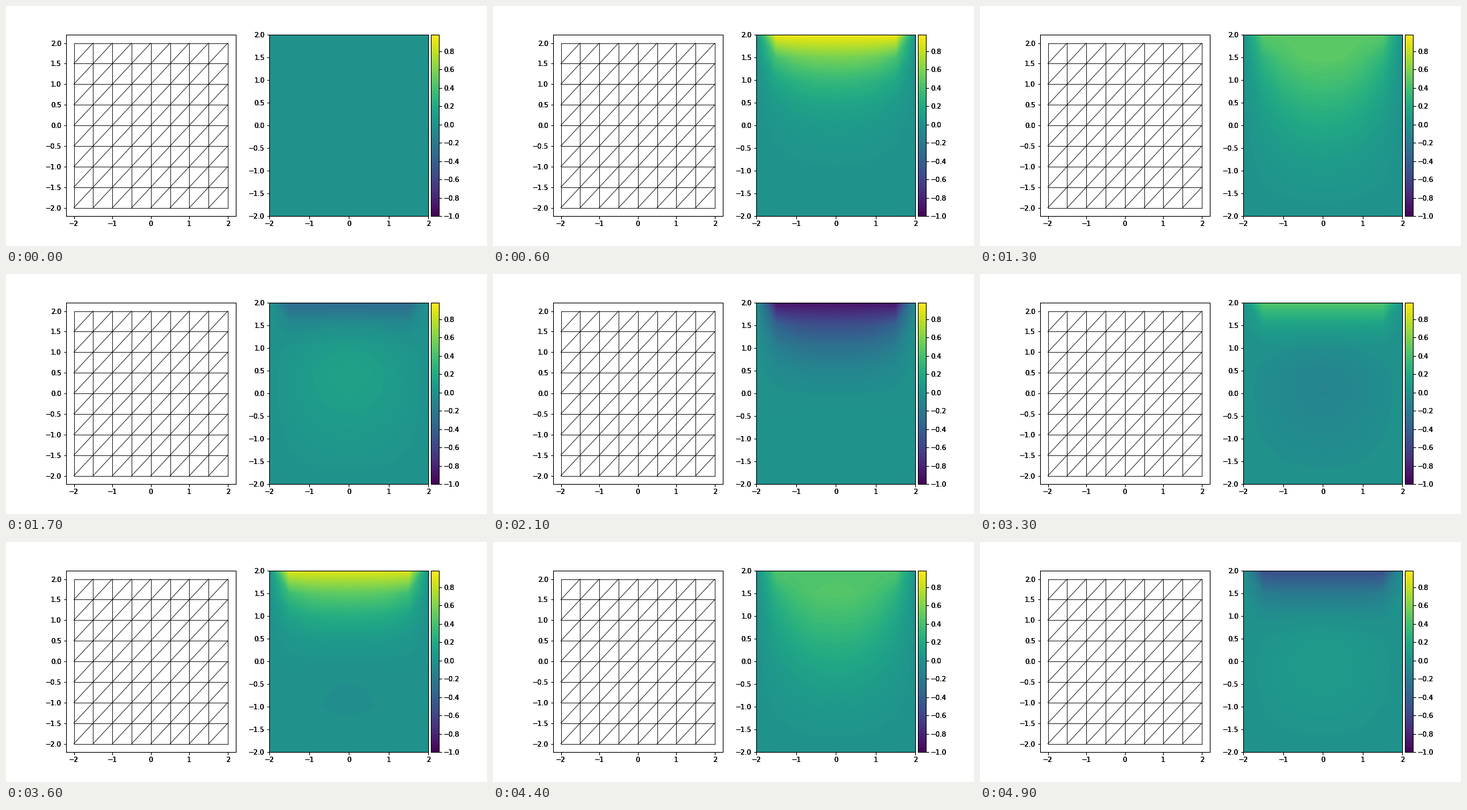
These frames come from a looping animation (720x360 px, 5 s). A matplotlib script:

```python
import numpy as np
import matplotlib.pyplot as plt
from matplotlib.animation import FuncAnimation

WIDTH, HEIGHT, DPI = 720, 360, 72
FRAMES, INTERVAL = 50, 100
BOTTOM, TOP = 45, 316.8
SUBSTEPS = 100
TEXT_PASSES = 3  # repeated passes darken the antialiased edges of labels

plt.rcParams.update({
    "font.family": "DejaVu Sans",
    "font.size": 10,
    "axes.unicode_minus": True,
})

nodes = np.linspace(-2, 2, 9)
spacing = nodes[1] - nodes[0]
levels = np.arange(-1, 1, 0.02)
times = np.linspace(0, 10, FRAMES)


def solve_heat():
    """Heat equation with a sin(t) top edge and the other edges held at zero."""
    u = np.zeros((nodes.size, nodes.size))
    dt = (times[1] - times[0]) / SUBSTEPS
    history = [u.copy()]
    for start in times[:-1]:
        for k in range(1, SUBSTEPS + 1):
            laplacian = (u[2:, 1:-1] + u[:-2, 1:-1] + u[1:-1, 2:]
                         + u[1:-1, :-2] - 4 * u[1:-1, 1:-1]) / spacing**2
            u[1:-1, 1:-1] += dt * laplacian
            u[-1, 1:-1] = np.sin(start + k * dt)
        history.append(u.copy())
    return history


def add_panel(left, right, xlim, ylim, xticks, yticks, yside="left"):
    """Stack identical transparent axes and return the lowest one."""
    rect = (left / WIDTH, BOTTOM / HEIGHT,
            (right - left) / WIDTH, (TOP - BOTTOM) / HEIGHT)
    stack = []
    for i in range(TEXT_PASSES):
        ax = fig.add_axes(rect, label=f"{left}-{i}", facecolor="none", zorder=i)
        ax.set(xlim=xlim, ylim=ylim, xticks=xticks, yticks=yticks)
        if yside == "right":
            ax.yaxis.tick_right()
        stack.append(ax)
    return stack[0]


fig = plt.figure(figsize=(WIDTH / DPI, HEIGHT / DPI), dpi=DPI, facecolor="white")
units = np.arange(-2, 3)
mesh_ax = add_panel(90, 343.6, (-2.2, 2.2), (-2.2, 2.2), units, nodes)
field_ax = add_panel(394.4, 632.5, (-2, 2), (-2, 2), units, nodes)
bar_ax = add_panel(636.1, 648, (0, 1), (levels[0], levels[-1]), [],
                   np.round(np.arange(-1, 0.9, 0.2), 1), "right")

# Structured mesh: grid lines plus the rising diagonal of every cell
line = dict(color="black", lw=0.8)
for c in nodes:
    mesh_ax.plot([-2, 2], [c, c], **line)
    mesh_ax.plot([c, c], [-2, 2], **line)
for shift in np.arange(-3.5, 4, spacing):
    x = np.array([max(-2, -2 - shift), min(2, 2 - shift)])
    mesh_ax.plot(x, x + shift, **line)

middles = (levels[:-1] + levels[1:]) / 2
bar_ax.pcolormesh([0, 1], levels, middles[:, None], cmap="viridis",
                  vmin=levels[0], vmax=levels[-1])

history = solve_heat()
current = []


def update(frame):
    while current:
        current.pop().remove()
    field = field_ax.contourf(nodes, nodes, history[frame], levels=levels,
                              cmap="viridis")
    current.append(field)
    return current


animation = FuncAnimation(fig, update, frames=FRAMES, interval=INTERVAL,
                          repeat=True, repeat_delay=0, blit=False)
plt.show()
```
